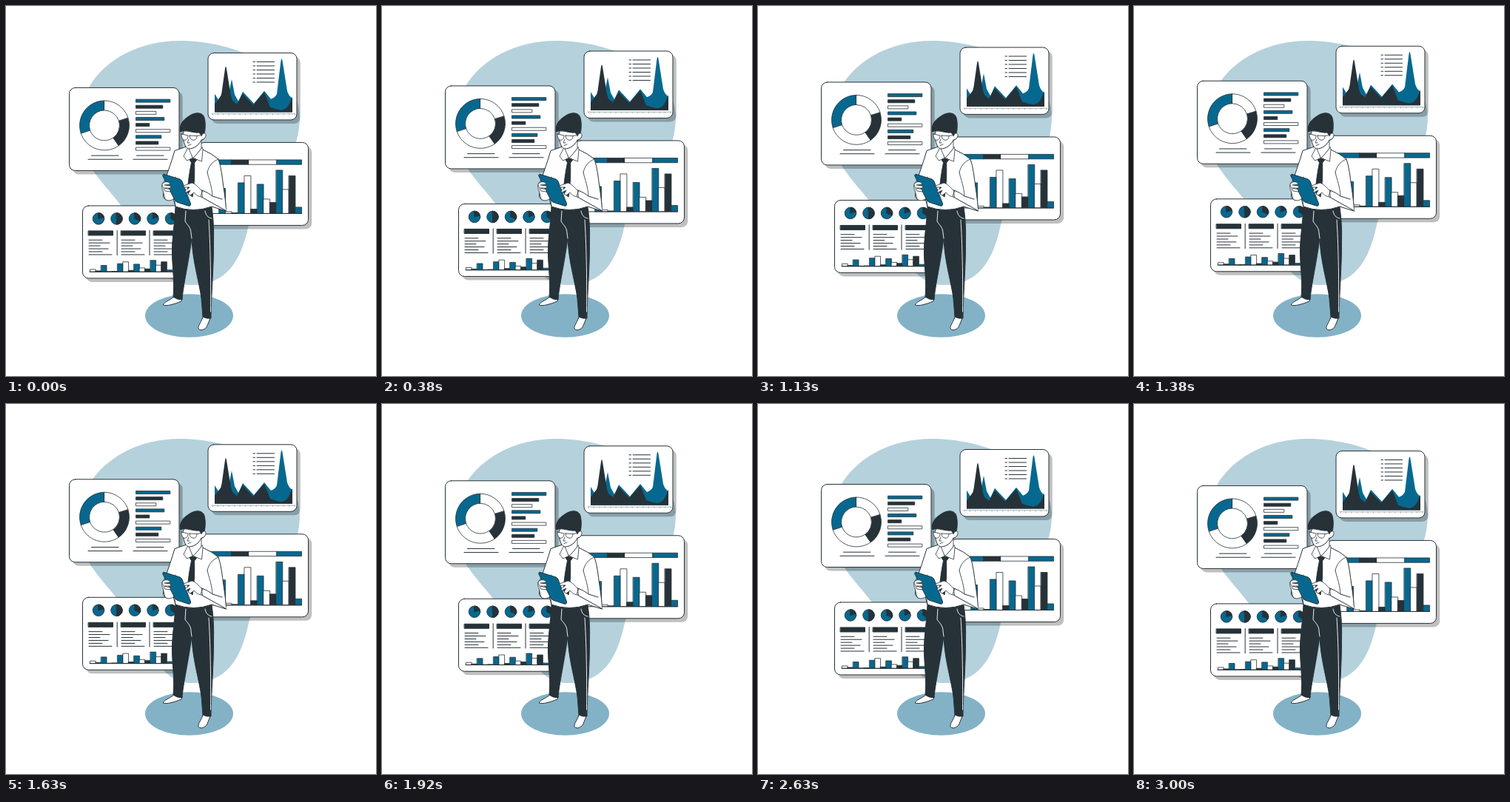
These frames come from a looping animation (500 px wide and 500 px high, 3040 ms). An HTML page:

```html
<!DOCTYPE html>
<html lang="en">
<head>
<meta charset="utf-8">
<title>Floating dashboards</title>
<style>
html, body { margin: 0; height: 100%; overflow: hidden; background: #fff; }
svg { display: block; width: 100vw; height: 100vh; }
.t { fill: #07688f; }
.d { fill: #263238; }
.w { fill: #fff; }
.n { fill: none; }
.thin { stroke-width: .8; }
</style>
</head>
<body>
<svg viewBox="0 0 500 500" stroke="#263238" stroke-linecap="round" stroke-linejoin="round">
  <path fill="#b5d1dc" stroke="none" d="M235 47C180 47 135 72 113 108C97 140 99 199 118 223C130 240 142 252 154 268C190 315 203 377 250 377C298 377 317 345 327.500 298C338 252 397 222 397 148C395 85 310 47 235 47Z"/>
  <ellipse fill="#83b2c6" stroke="none" cx="247.5" cy="418.5" rx="59.5" ry="29.3"/>
  <g id="panels"></g>
  <g id="man">
    <!-- shoes and trousers -->
    <path class="w" d="M227 393C221 398 213 400 212.500 404C217 406 227 403 237 399L238 395Z"/>
    <path class="w" d="M266 420C265 426 259 432 260 436C263 440 270 437 272 432L276 422Z"/>
    <path class="d" d="M229 271C228 295 224 315 224.500 335C225 357 228 372 226 393Q231 397 238 397C239 380 247 345 251 314C252 345 261 372 264 395L266 420Q271 423 277 422C277 395 281 350 280.500 318C281 300 280 285 278 272Z"/>
    <path class="n" stroke="#fff" stroke-width=".9" d="M269 277C270 283 273 286 278 287M274 289C276 320 277 365 276.500 413M243 277L242 291C245 296 250 299 250 307L251 314"/>
    <!-- shirt -->
    <path class="w" d="M244 190L228 195.500C224 209 219 224 214 237L212.500 257C214 263 221 264 226 260L229 271Q253 280 278 271L297 277C298 274 296 258 294 245C292 231 291 218 287 207Q279 200 266 194Z"/>
    <path class="n thin" d="M229 231C227 244 227 258 229 271M272 225C274 216 279 210 287 207M272 225C275 237 278 243 279 257"/>
    <!-- neck, collar and tie -->
    <path class="w thin" d="M247 188L246 197L253 206L264 193V178Z"/>
    <path class="d" d="M246 204L253 206.500L260 205L254.500 212C255 225 255 239 252 258L245 252C246 238 248 224 250.500 212Z"/>
    <path class="w thin" d="M246 191L240 203L244.500 209L252 205.500Z"/>
    <path class="w thin" d="M265 191C261 197 257 201 253 205.500L264.500 210L266 194Z"/>
    <!-- head -->
    <path class="w" d="M241 168C239 172 238 177 240 182C241 187 243 192 247 193C254 193 261 188 264 181C269 181 271 175 267 172L264 160Z"/>
    <path class="d" d="M235.500 169.500C234 160 239 154 247 149C255 143 266 143 268 151C270 158 269.500 168 267.500 174L264 175L261 171C252 172 246 167 235.500 169.500Z"/>
    <path class="w thin" d="M264 176C265 171 270 171 270 174C270 178 267 181 264 181"/>
    <path class="w thin" d="M237 173L246 175C246 180 243 182 240 181Q237 179 237 173ZM248 175L258 175.500C258 180 255 182 252 181Q248 180 248 175ZM258 175.500L265 174.500"/>
    <path class="n thin" d="M247 180L245 185L248 185M246 188.500L250 187"/>
    <!-- hands, tablet and forearm -->
    <path class="w thin" d="M214 237C210 239 210 245 212 249L215 261C220 265 226 262 229 258L229 239Z"/>
    <path class="t" d="M214 227.500L235 234Q237 235 238 237L249.500 267Q250 271 246 270L231 265Q229 264 228 262L212 230Q211 227 214 227.500Z"/>
    <path class="w thin" d="M211 241C213 237 218 237 221 239L222 241L214 242L222 243L223 246L214 246L222 248L222 251L215 250Z"/>
    <path class="w" d="M298 277L264 258L262 248C267 250 273 252 279 257L292 261"/>
    <path class="w thin" d="M264 249C260 245 256 240 251 239L240 243L240 245L248 245L242 250L243 252L249 249L246 254L249 256L254 252C257 256 261 258 265 258Z"/>
    <path class="n thin" d="M266 249L263 257"/>
  </g>
</svg>
<script>
const range = (n, f) => Array.from({ length: n }, (_, i) => f(i)).join('');
const kinds = 'tdw';

const rect = (x, y, w, h, cls) =>
  `<rect class="${cls}" x="${x}" y="${y}" width="${w}" height="${h}"/>`;

const line = (x1, y1, x2, y2, width = 1) =>
  `<path class="n" stroke-width="${width}" d="M${x1} ${y1}L${x2} ${y2}"/>`;

const panel = (x, y, w, h) =>
  `<rect x="${x + 4.7}" y="${y + 5}" width="${w}" height="${h}" rx="8" opacity=".25" stroke="none"/>
   <rect class="w" x="${x}" y="${y}" width="${w}" height="${h}" rx="8"/>`;

// Angles in degrees, clockwise from the top.
const polar = (x, y, r, deg) => {
  const a = deg * Math.PI / 180;
  return `${x + r * Math.sin(a)} ${y - r * Math.cos(a)}`;
};

const ring = (x, y, r, inner, from, to, cls) => {
  const big = to - from > 180 ? 1 : 0;
  return `<path class="${cls} thin" d="M${polar(x, y, r, from)}A${r} ${r} 0 ${big} 1 ${polar(x, y, r, to)}
    L${polar(x, y, inner, to)}A${inner} ${inner} 0 ${big} 0 ${polar(x, y, inner, from)}Z"/>`;
};

// Adjacent columns in repeating colours, standing on a base line.
const columns = (x, base, step, heights, order) =>
  `<g class="thin">${heights.map((h, i) =>
    rect(x + i * step, base - h, step, h, order[i % 3])).join('')}</g>`;

function donutPanel() {
  const bars = [46, 36, 27, 38, 18, 46, 34, 30, 46];
  return panel(85.5, 110.7, 148.5, 112) +
    ring(133, 161.7, 33.5, 20.5, 145, 252, 'w') +
    ring(133, 161.7, 33.5, 20.5, 252, 360, 't') +
    ring(133, 161.7, 33.5, 20.5, 0, 73, 'w') +
    ring(133, 161.7, 33.5, 20.5, 73, 145, 'd') +
    `<g class="thin">${bars.map((w, i) => rect(175.8, 126.4 + i * 8.12, w, 4, kinds[i % 3])).join('')}</g>` +
    [111, 172].map(x => line(x + 4.5, 202.4, x + 41, 202.4) + line(x, 207.5, x + 46, 207.5)).join('');
}

function areaPanel() {
  return panel(273, 63.7, 120, 90.5) +
    `<path class="t" stroke="none" d="M282 143.700V119L287 127L300 124L305 99L309 120L314 129L320 116L335 132L349 115L358 126Q364 124 366 119L371.500 74Q372.500 69 373.500 74L380 115Q382 122 387 125V143.700Z"/>
     <path class="d" stroke="none" d="M282 143.700V133L288 125Q291 122 291.500 117L296 85Q297 79 298 85L304 122L306 128L312 133L320 119L334 134L349 117L357 137Q365 140 372 141Q380 140 383 132L387 123V143.700Z"/>` +
    range(6, i => line(334, 75.7 + i * 5.5, 336.5, 75.7 + i * 5.5) +
      line(339, 75.7 + i * 5.5, 362.5, 75.7 + i * 5.5)) +
    `<g opacity=".55">${line(278, 146, 391, 146, .7)}${range(16, i => line(279 + i * 7.4, 146, 279 + i * 7.4, 147.5, .6))}</g>`;
}

function columnPanel() {
  return panel(260, 184.7, 148.5, 112) +
    `<g class="thin">${rect(268, 208.2, 37, 6.3, 't') + rect(305, 208.2, 23, 6.3, 'd') +
      rect(328, 208.2, 38, 6.3, 'w') + rect(366, 208.2, 33.5, 6.3, 't')}</g>` +
    columns(288, 280.7, 8.58, [34, 2.5, 1, 41.5, 51, 6, 39.5, 19.5, 15, 58.5, 32.5, 51, 8.5], 'twd') +
    line(268, 280.7, 399.5, 280.7);
}

function reportPanel() {
  const slices = [75, 180, 115, 70, 125];
  const ends = [18, 28, 15, 26, 18, 31];
  return panel(103.5, 270.2, 132.5, 98) +
    slices.map((a, i) => {
      const x = 125 + i * 24.5;
      return `<circle class="t thin" cx="${x}" cy="287.7" r="7.8"/>` + ring(x, 287.7, 7.8, 0, 0, a, 'd');
    }).join('') +
    [111.5, 155.5, 199.5].map((x, i) =>
      rect(x, 304.2, i < 2 ? 33 : 30, 6, 'd') +
      ends.map((w, k) => line(x + .5, 316.5 + k * 3.95, x + .5 + Math.min(w, i < 2 ? 31 : 29), 316.5 + k * 3.95)).join('')
    ).join('') +
    line(150.2, 303.7, 150.2, 337) + line(194, 303.7, 194, 337) +
    columns(113.8, 359.5, 7.4, [3.3, 1.3, 8.7, .4, .7, 11, 13.5, 2, 10.3, 5.3, 4, 15.5, 9, 13.5, 2.5], 'wdt') +
    line(113, 359.5, 229, 359.5);
}

const panels = document.getElementById('panels');
panels.innerHTML = areaPanel() + columnPanel() + donutPanel() + reportPanel();

const LOOP = 3040, STEPS = 72, STEP_MS = 3000 / STEPS, LIFT = 10;

// The lift is linear up and down, held at 24 steps a second; the loop starts one step in.
function draw() {
  const t = performance.now() % LOOP;
  const step = (Math.min(STEPS, Math.floor(t / STEP_MS + .1)) + 1) % STEPS;
  const lift = LIFT * (1 - Math.abs(1 - step / (STEPS / 2)));
  panels.setAttribute('transform', `translate(0 ${-lift})`);
  requestAnimationFrame(draw);
}
draw();
</script>
</body>
</html>
```
